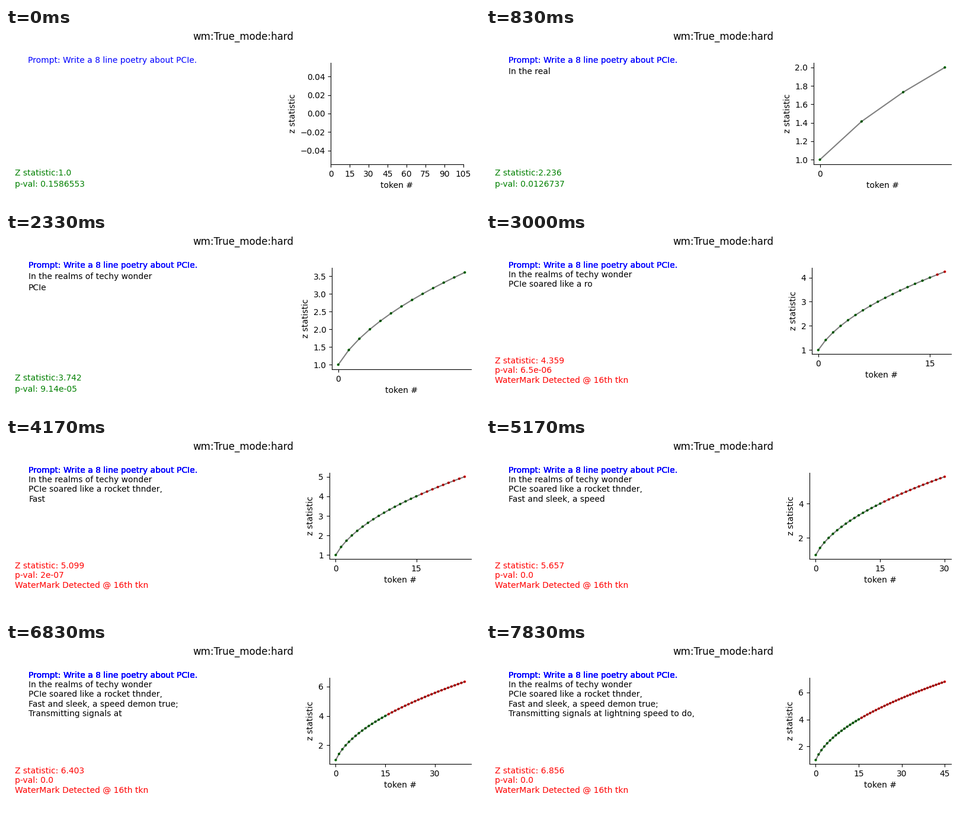
Write a matplotlib script that moves like this. It is 800 px wide and 300 px high and loops after 8 s.

```python
import math

import matplotlib.pyplot as plt
import numpy as np
from matplotlib.animation import FuncAnimation

W, H = 800, 300
FRAMES = 48
TOP = 241            # top of both panels, px from the bottom
DETECT = 16          # first token with z > 4
PROMPT = "Prompt: Write a 8 line poetry about PCIe."
TOKENS = (
    "\n|In| the| real|ms| of| tech|y| wonder|\n|"
    "P|CI|e| so|ared| like| a| ro|cket| th|n|der|,|\n|"
    "Fast| and| sle|ek|,| a| speed| demon| true|;|\n|"
    "Trans|mit|ting| signals| at| light|ning| speed| to| do|,|\n"
).split("|")

plt.rcParams.update({
    "font.family": "DejaVu Sans",
    "axes.spines.top": False,
    "axes.spines.right": False,
})

fig = plt.figure(figsize=(W / 100, H / 100), dpi=100)
fig.suptitle("wm:True_mode:hard")
ax = fig.add_axes([0.7, 0.25, 0.25, 0.5])
labels = []


def layout(i):
    """Text left edge, then plot left, right and bottom, in px."""
    if i == 0:
        return 36.6, 548.1, 771.75, 69
    if i < 10:
        return 37.6, 553, 785, 69
    if i < DETECT:
        return 37.6, 550.1, 785, 69
    if i < 24:
        return 37.6, 550.1, 785, 95
    return 38.2, 545.6, 785, 95


def put(x, row, text, color, bottom):
    y = TOP - row * (TOP - bottom) / 9
    labels.append(fig.text(x / W, y / H, text, color=color, fontsize=10))


def draw_text(i, left, bottom):
    lines = "".join(TOKENS[:i]).split("\n")
    # the prompt is laid over itself again at every line break
    for _ in lines:
        put(left, 0, PROMPT, "blue", bottom)
    for row, line in enumerate(lines):
        if line:
            put(left, row, line, "black", bottom)

    z = math.sqrt(i + 1)
    p = round(math.erfc(z / math.sqrt(2)) / 2, 7)
    found = i >= DETECT
    color = "red" if found else "green"
    gap = " " if found else ""
    put(15, 10, f"Z statistic:{gap}{round(z, 3)}", color, bottom)
    put(15, 11, f"p-val: {p}", color, bottom)
    if found:
        put(15, 12, f"WaterMark Detected @ {DETECT}th tkn", color, bottom)


def draw_plot(i, x0, x1, bottom):
    ax.clear()
    ax.set_position([x0 / W, bottom / H, (x1 - x0) / W, (TOP - bottom) / H])
    ax.set_xlabel("token #")
    ax.set_ylabel("z statistic")
    if i == 0:
        ax.set_xticks(range(0, 106, 15))
        ax.set_xlim(0, 105)
        ax.set_ylim(-0.055, 0.055)
        return
    x = np.arange(i)
    z = np.sqrt(x + 1)
    colors = ["red" if n >= DETECT else "green" for n in x]
    ax.scatter(x, z, s=2.5, c=colors, linewidths=1.5)
    ax.plot(x, z, color="black", alpha=0.5)
    ax.set_xticks(range(0, i, 15))


def update(i):
    for label in labels:
        label.remove()
    labels.clear()
    left, x0, x1, bottom = layout(i)
    draw_text(i, left, bottom)
    draw_plot(i, x0, x1, bottom)
    return []


anim = FuncAnimation(fig, update, frames=FRAMES, interval=8000 / FRAMES,
                     init_func=lambda: update(0), repeat=True, repeat_delay=0)
plt.show()
```
